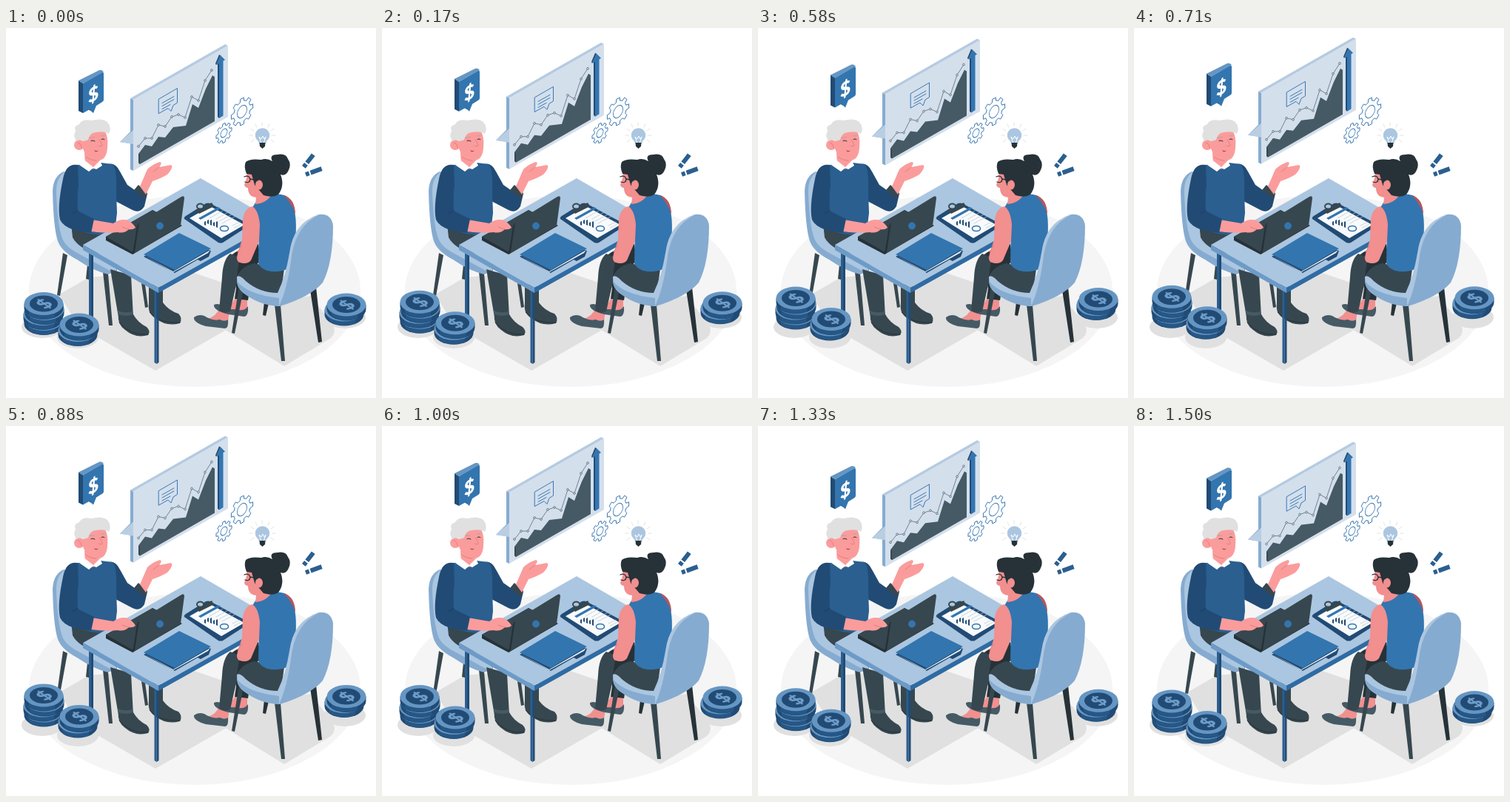
An HTML page for the animation above (1540 ms loop, 500 by 500 pixels).

```html
<!DOCTYPE html>
<html lang="en">
<head>
<meta charset="utf-8">
<title>Business meeting</title>
<style>
html, body { margin: 0; width: 100%; height: 100%; overflow: hidden; background: #fff; }
svg { display: block; width: 100%; height: 100%; }
text { font: 900 28px Lato, sans-serif; text-anchor: middle; }
.dark { fill: #37474f; } .ink { fill: #263238; }
.blue { fill: #3375af; } .navy { fill: #214b75; } .sweater { fill: #2a5f90; }
.pale { fill: #abc6e0; } .mid { fill: #86abd0; }
.skin { fill: #fb9c9c; } .skin2 { fill: #f28f8f; }
.line { fill: none; stroke: #3a78b2; stroke-width: 1; stroke-linejoin: round; stroke-linecap: round; }
.shade { fill: #e0e0e0; }
</style>
</head>
<body>
<svg viewBox="0 0 500 500">
  <ellipse cx="255" cy="355.500" rx="224" ry="129.500" fill="#f5f5f5"/>
  <g class="shade">
    <path d="M72 360L112 337L240 326L365 369L202 463L98 403Z"/>
    <path d="M290 404L340 372L412 362L442 402Q447 411 439 419L376 457Z"/>
    <ellipse cx="49" cy="404" rx="28" ry="15"/>
    <ellipse cx="97" cy="418" rx="28" ry="15"/>
    <ellipse cx="458" cy="391" rx="28" ry="15"/>
  </g>

  <g id="leftChair">
    <path class="dark" d="M77 304L83 307L73 362L69 361ZM110 320L115 322L112 340L108 339ZM131 330L138 332L144 402L139 402ZM183 345L188 347L192 377L188 378Z"/>
    <path class="mid" d="M78 194Q64 200 63 220Q64 270 70 288Q75 302 96 313Q118 328 138 333L150 328L150 290L94 200Z"/>
    <path class="pale" d="M80 194Q68 202 68 220Q69 264 76 284Q80 296 100 306L146 331L158 312L110 230Z"/>
  </g>

  <g id="man">
    <path class="dark" d="M88 264L90 283Q98 298 122 304L160 312L166 270ZM141 326L169 334L172 391L152 391ZM193 345L212 350L212 376L193 378Z"/>
    <path class="dark" d="M152 387Q162 391 172 387Q178 398 190 404Q196 410 192 415Q175 420 161 408Q150 400 152 387ZM193 373Q203 376 212 371Q220 382 233 386Q239 392 235 399Q217 404 203 393Q191 386 193 373Z"/>
    <path class="line" style="stroke:#263238" d="M153 398Q168 416 192 414M194 384Q207 400 235 398"/>
    <path fill="#455a64" d="M151 382Q161 386 171 383L172 387Q162 391 152 387Z"/>
    <path class="navy" d="M138 184Q148 181 154 194L164 212L174 219L178 213L191 224L187 241Q181 251 171 246L148 234Z"/>
    <path class="dark" d="M179 212L191 223L188 231L173 219Z"/>
    <path class="skin" d="M181 214L191 191Q198 184 208 181Q212 182 207 188L223 185Q227 188 218 198Q210 203 198 207L189 225Z"/>
    <path class="line" style="stroke:#e57d7d" d="M207 188L199 194"/>
    <path class="sweater" d="M97 185L128 182L144 184Q150 190 149 220L150 250L147 275Q117 286 90 268Q80 232 83 214Q84 193 97 185Z"/>
    <path class="skin" d="M106 168L127 172L127 186Q119 195 107 186Z"/>
    <path fill="#fff" d="M104 177L118 188L127 179L130 186L122 191L118 189L112 194L99 185Z"/>
    <path class="skin" d="M104 143L130 135Q139 143 137 162Q136 177 126 179Q114 180 108 172L104 163Z"/>
    <ellipse class="skin" cx="99" cy="158" rx="7" ry="7"/>
    <path class="line" style="stroke:#e57d7d" d="M97 155Q102 155 102 162M126 151Q131 158 130 159Q128 161 125 159M108 174Q114 179 122 179"/>
    <path fill="#e0e0e0" d="M95 153Q90 145 94 140Q91 132 99 130Q103 122 116 125Q130 121 137 127Q143 134 139 143Q133 139 121 141Q114 141 111 151L105 153Q101 149 95 153Z"/>
    <path class="line" style="stroke:#263238" d="M115 152.500Q117 151 120 153M129 150.500Q131 149 133 150.500"/>
    <path class="line" style="stroke:#b9a0a2;stroke-width:1.200" d="M113 148.500L119 147.500M128 146L133 145.500"/>
    <path fill="#a8434c" d="M119 165Q122 166.500 125 165.500Q123 168 120.500 167Z"/>
  </g>

  <g id="table">
    <path class="sweater" d="M112 302H115V395L112 393ZM200.500 354H203.500V454L200.500 452Z"/>
    <path class="navy" d="M115 302H118V393L115 395ZM203.500 354H206.500V452L203.500 454Z"/>
    <path class="pale" d="M263 203L365 262L206 351L104 293Z"/>
    <path fill="#6d9bc8" d="M104 293L206 351V358L104 300Z"/>
    <path fill="#2f6ba3" d="M206 351L365 262V269L206 358Z"/>
  </g>

  <g id="clipboard">
    <path class="navy" d="M241 258Q240 256 243 254L270 237Q273 236 276 237L330 266L293 290Q290 291 287 290Z"/>
    <path fill="#f8fafc" d="M248 257L276 241L322 266L291 284Z"/>
    <path class="dark" d="M256 246L278 236L281 241L261 251Z"/>
    <ellipse cx="262.500" cy="241" rx="4.500" ry="3.500" class="pale" stroke="#37474f" stroke-width="2"/>
    <path class="blue" d="M260 257L287 242L290 244L263 259Z"/>
    <path class="navy" d="M268 262l2 -1v6l-2 -1ZM272 264v-4l2 -1v6ZM276 266v-6l2 -1v8ZM280 267v-4l2 -1v6ZM284 269v-7l2 -1v9Z"/>
    <path class="line" style="stroke:#b8c4d0;stroke-width:.7" d="M275 257L293 247M284 258L300 249M288 261L305 252M292 264L309 255M306 267L316 262M308 270L318 265"/>
    <ellipse cx="295" cy="271" rx="5.500" ry="3.500" fill="none" stroke="#3375af" stroke-width="1.600"/>
  </g>

  <g id="folder">
    <path class="navy" d="M186 309L234 280L277 301L274 309L263 315L259 313L228 331Z"/>
    <path fill="#e8eff6" d="M187 308L226 329L276 300L273 304L226 330Z"/>
    <path class="blue" d="M186 306L234 277L277 298L228 327Z"/>
  </g>

  <g id="laptop">
    <path class="ink" d="M135 282L198 246L238 267L171 306L135 287Z"/>
    <path class="dark" d="M135 282L198 246L232 264L170 302Z"/>
    <path class="dark" d="M177 268Q177 265 180 263L237 228Q241 226 241 230L236 267L171 306Z"/>
    <path class="ink" d="M177 268L180 263L174 303L171 306Z"/>
    <circle class="blue" cx="208" cy="267.500" r="4.900"/>
  </g>

  <g id="nearArm">
    <path class="skin" d="M116 259L145 264Q155 257 165 260Q173 265 175 270Q171 273 166 272Q160 278 151 276Q136 278 115 275Z"/>
    <path class="line" style="stroke:#e57d7d" d="M166 272L157 269"/>
    <path class="navy" d="M97 185Q81 182 77 204Q69 242 73 259Q77 268 92 273L115 277L119 258L97 247Q96 226 98 212Z"/>
    <path class="line" style="stroke:#1a3e63" d="M97 247L90 250"/>
  </g>

  <g id="woman">
    <path class="skin2" d="M309 366L326 368L326 382L300 381ZM288 379L302 382L300 396L272 393Q284 390 288 379Z"/>
    <path fill="#455a64" d="M281 374Q287 371 294 376Q303 381 309 380Q322 384 327 376Q328 389 322 390L301 387Q280 382 281 374ZM254 391Q260 386 268 389Q278 396 289 394Q296 397 300 394Q301 406 296 406L270 403Q253 398 254 391Z"/>
    <path class="ink" d="M341 292Q316 297 303 308L311 352L309 366L327 368L333 330L344 312Z"/>
    <path class="dark" d="M303 305Q293 313 292 337L288 382Q295 387 303 383L312 343Q340 370 371 362L376 326L335 318Q318 322 312 336L316 310Z"/>
    <path class="blue" d="M337 236L360 225Q380 222 387 237Q394 255 391 287L384 323Q372 332 353 328Q343 324 341 318L342 270L331 246Z"/>
    <path fill="#b4575d" d="M375 225.500Q391 231 391 252Q387 238 375 225.500Z"/>
    <path class="skin2" d="M333 241Q341 246 343 265L342 288L331 314Q326 320 316 317Q310 315 313 305L319 286L320 258Q323 243 333 241Z"/>
    <path class="line" style="stroke:#da7575" d="M313 303Q316 298 318 294"/>
    <path class="skin2" d="M326 190L325 203L322 212Q323 216 327 216Q327 228 338 229L337 238Q349 238 358 227L352 192Z"/>
    <path class="ink" d="M324 181Q330 176 345 178Q352 175 360 180Q355 171 367 171Q378 169 381 177Q386 184 382 192Q378 201 371 198Q377 213 368 225Q361 230 348 226L336 212L332 198L325 197Q321 187 324 181Z"/>
    <ellipse class="skin2" cx="342" cy="212" rx="5" ry="6.500"/>
    <path class="line" style="stroke:#263238;stroke-width:1.3" d="M322 201Q329 198 330 205Q329 210 323 208M330 204L340 206"/>
  </g>

  <g id="rightChair">
    <path class="ink" d="M349 370L355 372L351 389L347 388Z"/>
    <path class="dark" d="M315 349L321 353L309 413L305 412ZM363 374L371 374L377 450L372 450Z"/>
    <path class="ink" d="M411 354L419 350L427 424L422 425Z"/>
    <path class="pale" d="M312 336Q316 333 324 342Q343 358 367 358Q378 335 383 304Q388 264 422 252Q432 251 436 255L372 376Q350 376 322 359Q311 351 312 336Z"/>
    <path class="mid" d="M369 376Q380 352 385 315Q390 267 424 252Q440 251 442 267Q442 317 428 344Q412 363 370 376ZM312 342Q326 360 369 365V376Q343 375 322 359Q312 352 312 342Z"/>
  </g>

  <g id="idea">
    <path class="line" style="stroke:#e2e2da" d="M346 128v4M337 130l2 4M356 130l-2 4M331 136l4 3M362 136l-4 3M329 145h4M360 145h4M331 154l4 -3M362 154l-4 -3"/>
    <path class="pale" d="M342 156Q342 153 339 151A9.700 9.700 0 1 1 354 151Q351 153 351 156Z"/>
    <path class="line" style="stroke:#fff" d="M345 156L342 147L345 150L347 146L349 150L351 147L348 156"/>
    <path class="ink" d="M342.500 155L350.500 155L350 160L346.500 163L343 160Z"/>
    <g class="sweater">
      <path transform="translate(403 187) rotate(-52)" d="M-1 -3H4V3H-1ZM6 -3H20V3H6Z"/>
      <path transform="translate(405 198) rotate(-20)" d="M0 -3H5V3H0ZM7 -3H23V3H7Z"/>
    </g>
  </g>
  <g id="gears"></g>

  <g class="float">
    <path fill="#b5cbe1" d="M168 95L296 22L300 24L172 97Z"/>
    <path class="mid" d="M168 95L172 97V193L168 191V156L154 154L168 140Z"/>
    <path fill="#d4dfec" d="M172 97L300 24V120L172 193Z"/>
    <path fill="#b9cee3" d="M154 154L172 138V157Z"/>
    <path fill="#455a64" d="M179 170L188 158L197 160L206 147L215 148L226 134L243 132L252 103L260 108L270 82L279 64L282 66V126L181 184L179 182Z"/>
    <path class="dark" d="M179 170L181 172V184L179 182Z"/>
    <g id="trend"></g>
    <path class="navy" d="M286 47L288 48V122L286 120Z"/>
    <path class="blue" d="M288 48L284 50L290 37L296 43L293.500 44.500V118.500L288 122Z"/>
    <path class="navy" d="M288 36L290 37L284 50L283 48Z"/>
    <path class="line" d="M206.500 96L231.500 81.500V101L226 104.500L223 112.500L219 108.500L206.500 115.500ZM211 101.500L227 92.500M211 105.500L227 96.500M211 109.500L222 103.500"/>
  </g>

  <g class="float">
    <path fill="#6596c4" d="M98 71L126 57Q129 56 132 59L104 75Z"/>
    <path class="navy" d="M98 71L104 75V115L98 112ZM111 110L118 114L118 106Z"/>
    <path class="blue" d="M104 75L130 60Q132 59 132 62V97Q132 99 130 100L122 105L118 115L113 110L104 115Z"/>
    <text fill="#fff" transform="matrix(.87 -.4 0 .95 118 99)">$</text>
  </g>
  <g class="float" id="coins"></g>
</svg>
<script>
const PERIOD = 1540, LIFT = 10;
const byId = id => document.getElementById(id);

function gear(cx, cy, radius, hole, teeth) {
  const points = [];
  for (let i = 0; i < teeth; i++)
    for (const [offset, scale] of [[-.3, .77], [-.2, 1], [.2, 1], [.3, .77]]) {
      const a = (i + offset) / teeth * Math.PI * 2;
      points.push([Math.cos(a) * radius * scale, Math.sin(a) * radius * scale].map(v => v.toFixed(2)));
    }
  return `<g class="line" transform="matrix(.82 -.42 0 1 ${cx} ${cy})">
    <polygon points="${points.join(' ')}" vector-effect="non-scaling-stroke"/><circle r="${hole}"/></g>`;
}

// Coins are listed from the bottom up; only the top face carries a mark.
function stack(coins) {
  return coins.map(([x, y], i) => `<g transform="translate(${x} ${y})">
    <path class="navy" d="M-26.500 0V6A26.500 15.500 0 0 0 26.500 6V0Z"/>
    <path class="sweater" d="M-20 6V15A26.500 15.500 0 0 0 15 18.500V9Z" opacity=".65"/>
    <ellipse rx="26.500" ry="15.500" fill="#6596c3"/>
    <ellipse rx="19" ry="11" class="navy"/>
    ${i === coins.length - 1 ? '<text fill="#6e9dc9" style="font-size:24px" transform="matrix(.87 -.5 .87 .5 8 4.5)">$</text>' : ''}
  </g>`).join('');
}

function trend(heights) {
  const points = heights.map((y, i) => [179 + i * 9, y]);
  const dots = points.map(([x, y]) => `<circle cx="${x}" cy="${y}" r="1.400" fill="#d4dfec"/>`);
  return `<g fill="none" stroke="#596d79" stroke-width=".8"><polyline points="${points.join(' ')}"/>${dots.join('')}</g>`;
}

byId('gears').innerHTML = gear(319, 113, 18, 8, 8) + gear(294.500, 142, 13, 5.500, 8);
byId('trend').innerHTML = trend([160, 149, 149, 131, 133, 120, 117, 121, 93, 98, 71, 57]);
byId('coins').innerHTML =
  stack([[51, 393.500], [50, 386.500], [52, 379.500], [51, 372.500]]) +
  stack([[97, 408.500], [99, 401]]) +
  stack([[457, 381], [460, 374]]);

const floating = document.querySelectorAll('.float');
function draw(now) {
  const phase = now % PERIOD / PERIOD;
  const y = -LIFT * (1 - Math.abs(1 - 2 * phase));
  floating.forEach(part => part.setAttribute('transform', `translate(0 ${y.toFixed(3)})`));
  requestAnimationFrame(draw);
}
draw(performance.now());
</script>
</body>
</html>
```
